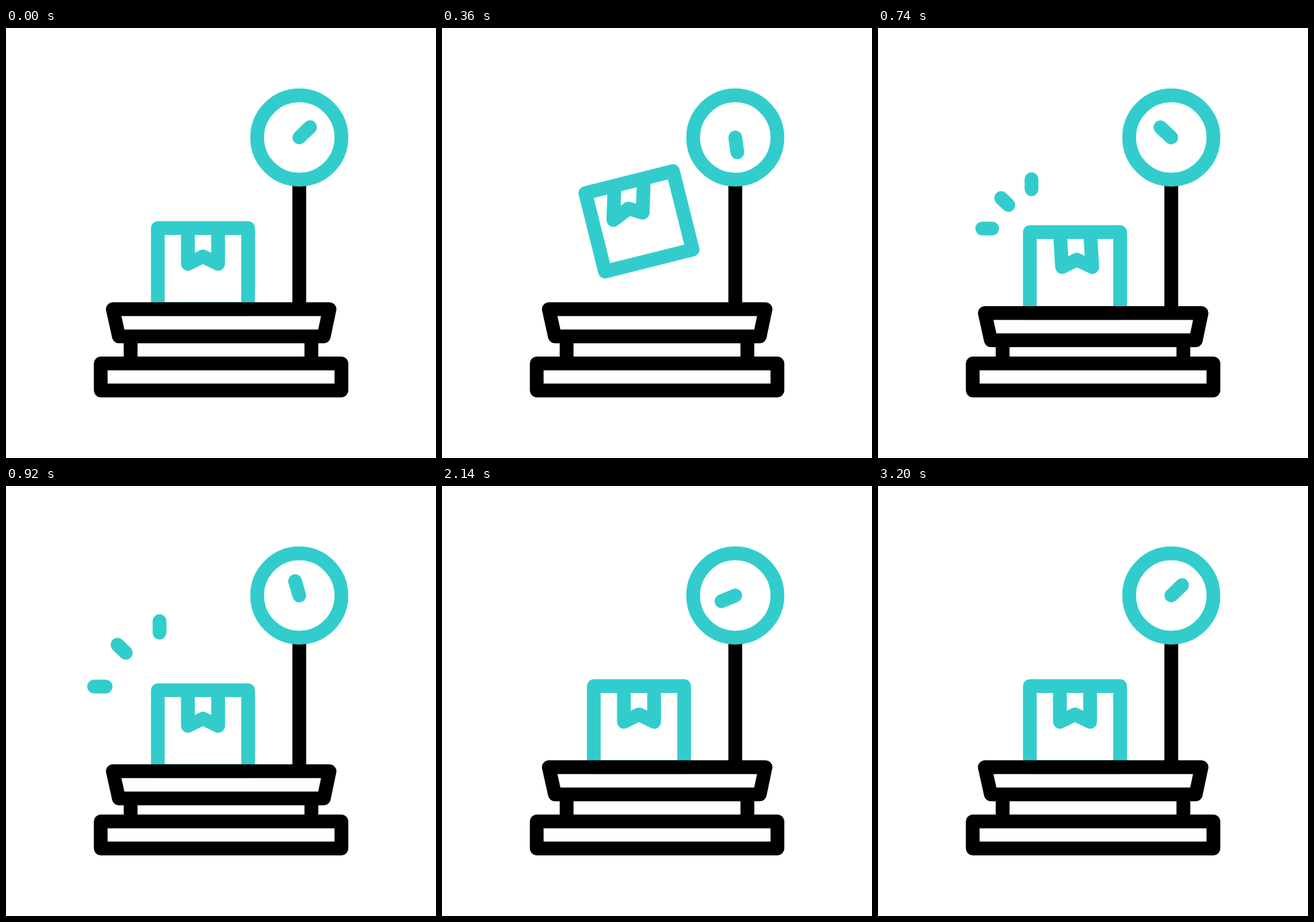
Recreate the animation shown at these times as an HTML page. Size 640 by 640 pixels, loop 3.6 s.

```html
<!DOCTYPE html>
<html>
<head>
<meta charset="utf-8">
<style>
html, body { margin: 0; width: 100%; height: 100%; overflow: hidden; background: #fff; }
svg { display: block; width: 100vw; height: 100vh; fill: none; stroke: #000; stroke-width: 20.5; stroke-linejoin: round; }
.teal { stroke: #3cc; }
.round { stroke-linecap: round; }
</style>
</head>
<body>
<svg viewBox="0 0 640 640">
  <g id="load">
    <g id="box" class="teal">
      <rect x="-67.2" y="-60.2" width="134.4" height="120.4"/>
      <path id="ribbon"/>
    </g>
    <path d="M436.5 225V418"/>
    <path d="M159 418.5H481.5L473 459H168Z"/>
  </g>
  <path d="M185.5 465V499M454.5 465V499M141 499.3H499.2V539.5H141Z"/>
  <path id="rays" class="teal round"/>
  <circle class="teal" cx="436.5" cy="163" r="62.7"/>
  <path id="needle" class="teal round" d="M436.5 163V140.7"/>
</svg>
<script>
const LOOP = 3600;
const $ = id => document.getElementById(id);
const ease = u => u * u * (3 - 2 * u);

// Eased value at time t through [time, value] keys
function track(t, keys) {
  if (t <= keys[0][0]) return keys[0][1];
  for (let i = 1; i < keys.length; i++) {
    const [t0, a] = keys[i - 1], [t1, b] = keys[i];
    if (t <= t1) return a + (b - a) * ease((t - t0) / (t1 - t0));
  }
  return keys[keys.length - 1][1];
}

// Start and direction of each spark, travelling outward
const sparks = [[228.5, 240, 0, -1], [194, 263.5, -0.72, -0.7], [170, 298.5, -1, 0]];

function draw(now) {
  const t = now % LOOP;
  const lift = track(t, [[0, 0], [313, 1], [626, 0]]);
  const sway = track(t, [[0, 0], [310, -17], [590, 17], [800, 0]]);
  const sink = track(t, [[626, 0], [833, 10], [1040, 0]]);
  const angle = track(t, [[0, 46], [300, -193], [900, -16], [1800, -140], [3200, 46]]);

  $('load').setAttribute('transform', `translate(0 ${sink})`);
  $('box').setAttribute('transform', `translate(293.2 ${358 - 75 * lift}) rotate(${-15 * lift})`);
  const low = -7 - 0.3 * Math.abs(sway);
  $('ribbon').setAttribute('d',
    `M-22.5 -60.2L${sway - 22.5} ${low}L${sway * 0.75} ${low - 11}L${sway + 22.5} ${low}L22.5 -60.2`);
  $('needle').setAttribute('transform', `rotate(${angle} 436.5 163)`);

  const head = track(t, [[640, 0], [880, 39]]);
  const tail = track(t, [[760, 0], [1060, 39]]);
  $('rays').setAttribute('d', head - tail < 0.1 ? '' : sparks.map(([x, y, dx, dy]) =>
    `M${x + dx * tail} ${y + dy * tail}L${x + dx * head} ${y + dy * head}`).join(''));

  requestAnimationFrame(frame);
}

const start = performance.now();
function frame() { draw(performance.now() - start); }
frame();
</script>
</body>
</html>
```
